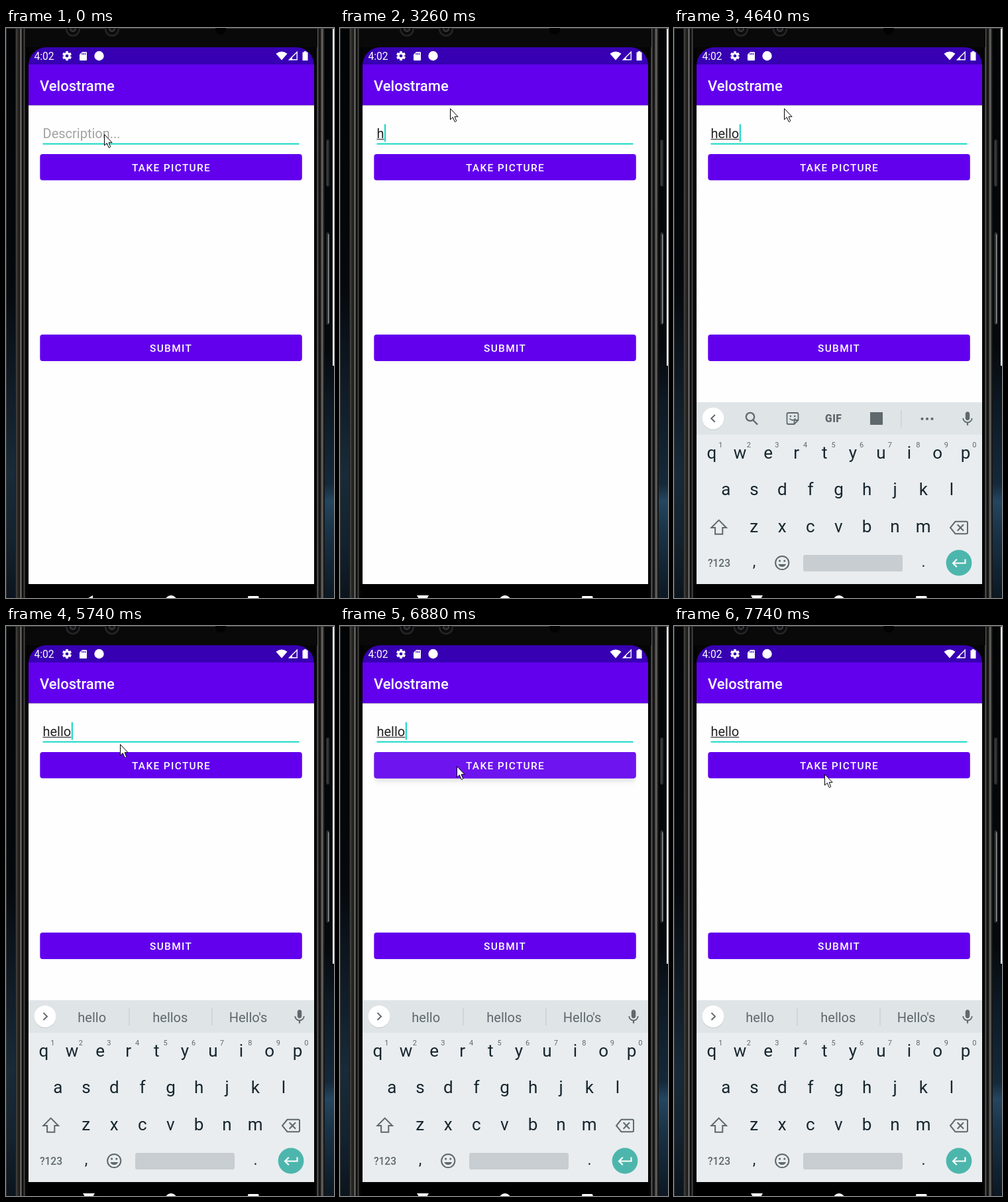
Recreate the animation shown at these times as an HTML page with a canvas. Size 495 px wide and 859 px high, loop 8 s.

```html
<!DOCTYPE html>
<html lang="en">
<head>
<meta charset="utf-8">
<title>Post form</title>
<style>
  html, body { margin: 0; width: 100%; height: 100%; overflow: hidden; background: #000; }
  canvas { display: block; }
</style>
</head>
<body>
<canvas id="stage" width="495" height="859"></canvas>
<script>
const ctx = document.getElementById('stage').getContext('2d');
const LOOP = 8000;
const PURPLE = '#6200ee', TEAL = '#13d8c6', GREY = '#5f686d', INK = '#17262e';

// Each track lists [start time, value]; values hold until the next entry.
const tracks = {
  caret: [[0, 0], [660, 1], [1240, 0], [1670, 1], [2240, 0], [2750, 1], [3790, 0], [4370, 1],
    [5070, 0], [5470, 1], [6180, 0], [6610, 1], [7310, 0]],
  typed: [[0, ''], [3260, 'h'], [3660, 'he'], [4640, 'hello']],
  navDown: [[0, false], [2240, true]],
  keyboard: [[0, ''], [4640, 'tools'], [5070, 'words']],
  pointer: [[0, [148, 160]], [1090, [166, 121]], [5340, [179, 138]], [5470, [185, 162]],
    [5590, [178, 173]], [5740, [172, 178]], [6020, [172, 184]], [6180, [176, 211]],
    [7160, [199, 229]], [7310, [208, 235]], [7440, [215, 238]], [7590, [220, 235]],
    [7740, [227, 223]]],
  // ripple radius, ripple opacity, shadow opacity
  press: [[0, [0, 0, 0]], [6740, [121, .08, 0]], [6880, [400, .08, .12]],
    [7160, [400, .08, .24]], [7310, [400, .04, .1]], [7440, [0, 0, 0]]]
};
const at = (track, t) => track.filter(([start]) => start <= t).pop()[1];

function rect(x, y, w, h, color) {
  ctx.fillStyle = color;
  ctx.fillRect(x, y, w, h);
}
function round(x, y, w, h, r, color) {
  ctx.beginPath();
  ctx.roundRect(x, y, w, h, r);
  ctx.fillStyle = color;
  ctx.fill();
}
function disc(x, y, r, color) {
  ctx.beginPath();
  ctx.arc(x, y, r, 0, Math.PI * 2);
  ctx.fillStyle = color;
  ctx.fill();
}
function fill(d, color) {
  ctx.fillStyle = color;
  ctx.fill(new Path2D(d));
}
function line(d, color, width = 2) {
  ctx.strokeStyle = color;
  ctx.lineWidth = width;
  ctx.stroke(new Path2D(d));
}
function text(s, x, y, size, color, { weight = 400, align = 'left', spacing = 0 } = {}) {
  ctx.font = `${weight} ${size}px Roboto, sans-serif`;
  ctx.letterSpacing = spacing + 'px';
  ctx.textAlign = align;
  ctx.fillStyle = color;
  ctx.fillText(s, x, y);
}
function icon(d, x, y, scale, color) {
  ctx.save();
  ctx.translate(x, y);
  ctx.scale(scale, scale);
  ctx.translate(-12, -12);
  fill(d, color);
  ctx.restore();
}
function gradient(x0, y0, x1, y1, stops) {
  const g = ctx.createLinearGradient(x0, y0, x1, y1);
  stops.forEach(([p, c]) => g.addColorStop(p, c));
  return g;
}

function drawPhone() {
  rect(0, 0, 495, 859, '#000');
  rect(0, 0, 15, 859, gradient(0, 0, 0, 859,
    [[0, '#020304'], [.45, '#05080c'], [.6, '#0e1822'], [.78, '#192a38'], [.9, '#14222e'], [1, '#0b141d']]));
  rect(0, 0, 1, 859, '#34383a');
  rect(481, 0, 14, 859, gradient(481, 0, 495, 859,
    [[0, '#030405'], [.56, '#05090d'], [.66, '#0d1924'], [.8, '#15293a'], [.83, '#244660'], [.88, '#1a3448'], [1, '#0c1823']]));
  rect(493, 0, 2, 509, '#fff');

  rect(14, 0, 467, 859, '#050505');
  rect(14, 0, 20, 859, gradient(14, 0, 34, 0,
    [[0, '#0a0a0a'], [.08, '#45433f'], [.2, '#272624'], [.34, '#1c1b1a'], [.42, '#817f7c'],
      [.5, '#1a1a1a'], [.58, '#080808'], [.68, '#4a4948'], [.76, '#070707'], [1, '#000']]));
  rect(465, 0, 16, 859, gradient(465, 0, 481, 0,
    [[0, '#000'], [.22, '#090909'], [.34, '#5c5b59'], [.45, '#101010'], [.6, '#1c1b1a'],
      [.76, '#73716e'], [.88, '#2d2c2a'], [1, '#080808']]));
  rect(29, 0, 441, 29, '#090909');
  rect(0, 0, 495, 1, '#3c3c3c');
  for (const x of [101, 160]) {
    disc(x, 2, 11, '#252526');
    disc(x, 2, 8.5, '#0c0c0d');
    disc(x, 1, 5, '#3a3b3e');
    disc(x, 1, 3, '#17181b');
  }
  disc(324, 2, 8, '#020202');

  round(483.5, 168, 4.5, 71, 2, '#2b2c2d');
  rect(484, 170, 1, 67, '#4b4c4d');
  round(483.5, 308, 4.5, 139, 2, '#303133');
  rect(486, 311, 1.5, 134, '#8c8e90');
}

function drawStatusBar() {
  text('4:02', 42.5, 48, 15.6, '#fff');
  ctx.save();
  ctx.translate(92, 42);
  ctx.fillStyle = '#fff';
  for (let i = 0; i < 6; i++) {
    ctx.fillRect(-1.9, -7, 3.8, 4);
    ctx.rotate(Math.PI / 3);
  }
  ctx.beginPath();
  ctx.arc(0, 0, 3.8, 0, Math.PI * 2);
  ctx.lineWidth = 2.9;
  ctx.strokeStyle = '#fff';
  ctx.stroke();
  ctx.restore();

  fill('M115 36H121Q122 36 122 37V48Q122 49 121 49H112Q111 49 111 48V40Z', '#fff');
  for (const x of [114.3, 116.7, 119.1]) rect(x, 37.6, 1.2, 2.8, '#3700b3');
  disc(140.5, 42, 7.2, '#fff');

  fill('M407.5 38.8Q416 32 424.5 38.8L416 48.5Z', '#fff');
  line('M427.5 47.7H439.2V36.2Z', '#fff', 1.4);
  fill('M432 43.2V48.3H427Z', '#fff');
  fill('M447.5 36.5H449.7V35H453.3V36.5H455.5V49H447.5Z', '#fff');
}

function drawButton(label, x, y) {
  round(51.3, y, 395.5, 40, 4, PURPLE);
  text(label, x, y + 26, 15.4, '#fff', { weight: 500, spacing: 1.37 });
}

function drawTakePicture([radius, glow, shadow]) {
  if (shadow) {
    ctx.save();
    ctx.shadowColor = `rgba(0,0,0,${shadow})`;
    ctx.shadowBlur = 7;
    ctx.shadowOffsetY = 4;
    ctx.beginPath();
    ctx.rect(51, 190, 396, 60);
    ctx.clip();
    round(52, 190, 394, 39.5, 4, PURPLE);
    ctx.restore();
  }
  round(51.3, 190, 395.5, 39.6, 4, PURPLE);
  if (radius) {
    ctx.save();
    ctx.beginPath();
    ctx.roundRect(51.3, 190, 395.5, 39.6, 4);
    ctx.clip();
    disc(178, 211, radius, `rgba(255,255,255,${glow})`);
    ctx.restore();
  }
  text('TAKE PICTURE', 190, 215.8, 15.4, '#fff', { weight: 500, spacing: 1.37 });
}

function drawField(typed, caret) {
  const left = 55.5;
  text(typed || 'Description...', left, 166, 20, typed ? '#222' : '#a2a2a2');
  const width = typed ? ctx.measureText(typed).width : 0;
  if (typed) rect(left, 167, width, 1.2, '#333');
  rect(55.5, 173.6, 387, 2, TEAL);
  if (caret) rect(left + width + .5, 145, 2.1, 26.5, TEAL);
}

function drawMic() {
  icon('M12 14c1.66 0 3-1.34 3-3V5c0-1.66-1.34-3-3-3S9 3.34 9 5v6c0 1.66 1.34 3 3 3z' +
    'm5.3-3c0 3-2.54 5.1-5.3 5.1S6.7 14 6.7 11H5c0 3.41 2.72 6.23 6 6.72V21h2v-3.28' +
    'c3.28-.48 6-3.3 6-6.72h-1.7z', 443, 589, 1.08, GREY);
}

function drawToolStrip(mode) {
  rect(34, 564, 431, 49, '#dfe4e7');
  disc(59, 589.2, 16.7, 'rgba(0,0,0,.12)');
  disc(59, 588.4, 16.5, '#fff');
  drawMic();
  if (mode === 'words') {
    line('M56.5 583L62 588.4L56.5 593.8', GREY);
    text('hello', 129.7, 596.5, 20, GREY, { align: 'center' });
    text('hellos', 247.8, 596.5, 20, GREY, { align: 'center' });
    text("Hello's", 365.5, 596.5, 20, GREY, { align: 'center' });
    rect(185.5, 575, 1, 27, '#c3c9cc');
    rect(310.5, 575, 1, 27, '#c3c9cc');
    return;
  }
  line('M61.8 583L56.3 588.4L61.8 593.8', GREY);
  line('M121.2 586a6.2 6.2 0 1 0-12.4 0a6.2 6.2 0 1 0 12.4 0M119.4 591L126 597.6', GREY, 2.3);
  line('M172.5 580H185.5Q187.5 580 187.5 582V591L181.5 597H172.5Q170.5 597 170.5 595V582Q170.5 580 172.5 580Z' +
    'M187 591H183.5Q181.5 591 181.5 593V597M174.5 588.5Q179 593.5 183.5 588.5', GREY, 1.8);
  disc(175.8, 585, 1.3, GREY);
  disc(182.2, 585, 1.3, GREY);
  text('GIF', 228, 594, 15.6, GREY, { weight: 900, spacing: .5 });
  rect(296, 579, 19, 19, GREY);
  rect(342.5, 576, 1, 26, '#c3c9cc');
  for (const x of [374.5, 382, 389.5]) disc(x, 589, 2.1, GREY);
}

function drawKeyboard(mode) {
  rect(34, 612, 431, 226, '#e9edf0');
  drawToolStrip(mode);
  const pitch = 42.57;
  const row = (keys, x, y) => [...keys].forEach((key, i) =>
    text(key, x + i * pitch, y, 26, INK, { align: 'center' }));
  row('qwertyuiop', 57, 649);
  row('asdfghjkl', 78.3, 704);
  row('zxcvbnm', 120.7, 759.5);
  [...'1234567890'].forEach((n, i) =>
    text(n, 70.3 + i * pitch, 632, 11, GREY, { align: 'center' }));

  line('M67.7 741.6L79 753H73.3V762.8H62.1V753H56.4Z', GREY);
  line('M424.5 743.8H441Q443 743.8 443 745.8V760.2Q443 762.2 441 762.2H424.5L417 753Z' +
    'M427.7 748.3L437 757.7M437 748.3L427.7 757.7', GREY);

  text('?123', 68, 812, 15.6, GREY, { align: 'center', weight: 500 });
  text(',', 121, 812, 23, INK, { align: 'center' });
  text('.', 376.5, 812, 23, INK, { align: 'center' });
  line('M173.3 806a10.1 10.1 0 1 0-20.2 0a10.1 10.1 0 1 0 20.2 0', GREY);
  disc(159.6, 803, 1.6, GREY);
  disc(166.8, 803, 1.6, GREY);
  fill('M157.3 808H169.1A6.3 6.3 0 0 1 157.3 808Z', GREY);
  round(195, 794, 150, 25, 3, '#c8cdd1');
  disc(430, 806, 19.4, '#4db6ac');
  line('M439.5 800.5V806.5H421.5M426.8 800.8L421 806.5L426.8 812.2', '#fff', 2.1);
}

function drawNavBar(down) {
  rect(34, 838, 431, 21, '#000');
  fill(down ? 'M116 855H134L125 870Z' : 'M116 864L131 855V873Z', '#fff');
  disc(249, 864, 9, '#fff');
  round(365, 856, 16.5, 16, 1.5, '#fff');
}

function drawPointer([x, y]) {
  ctx.save();
  ctx.translate(x + .5, y + .5);
  const arrow = 'M0 0V16.5L3.8 13L6.6 19.6Q8 20.4 9.2 18.6L6.6 12.2H11.6Z';
  fill(arrow, '#fff');
  line(arrow, '#000', 1);
  ctx.restore();
}

function draw(t) {
  const now = name => at(tracks[name], t);
  drawPhone();

  ctx.save();
  ctx.beginPath();
  ctx.roundRect(34, 29, 431, 830, [27, 27, 0, 0]);
  ctx.clip();
  rect(34, 29, 431, 26, '#3700b3');
  rect(34, 55, 431, 61.5, PURPLE);
  rect(34, 116.5, 431, 721.5, '#fefefe');
  drawStatusBar();
  text('Velostrame', 51, 94.5, 22, '#fff', { weight: 500 });
  drawField(now('typed'), now('caret'));
  drawTakePicture(now('press'));
  drawButton('SUBMIT', 217, 462);
  const keyboard = now('keyboard');
  if (keyboard) drawKeyboard(keyboard);
  drawNavBar(now('navDown'));
  ctx.restore();

  drawPointer(now('pointer'));
}

const start = performance.now();
function tick() {
  draw((performance.now() - start) % LOOP);
  requestAnimationFrame(tick);
}
tick();
</script>
</body>
</html>
```
